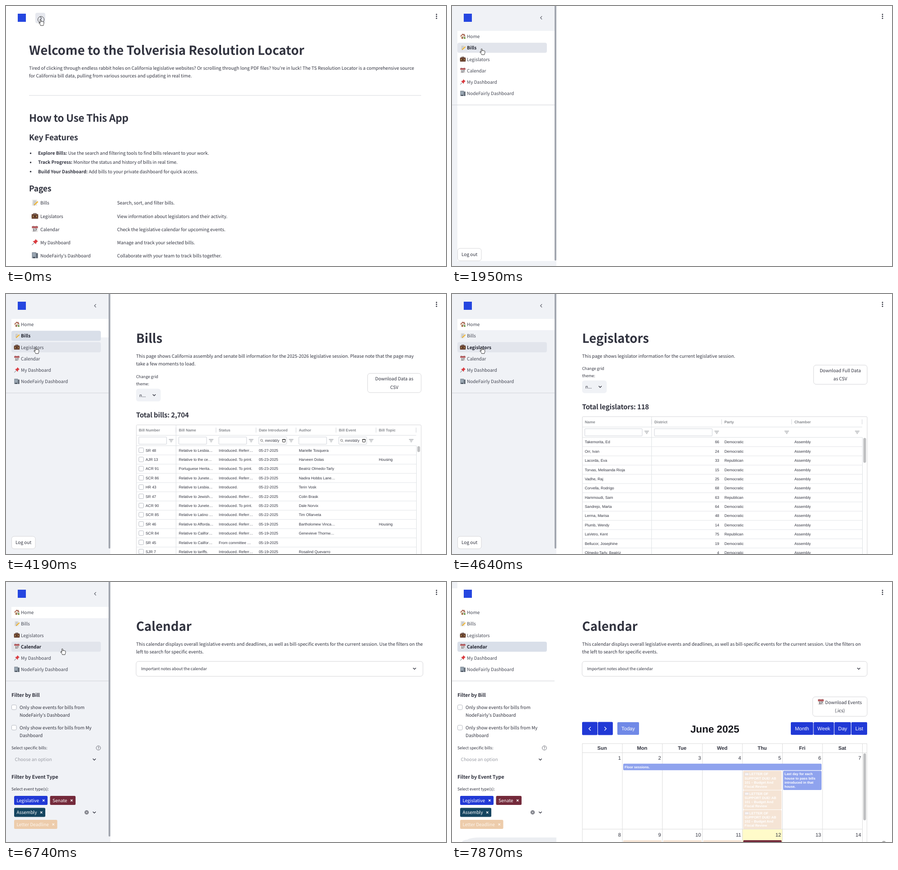
An HTML page for the animation above (7890 ms loop, 974x575 px).

```html
<!DOCTYPE html>
<html lang="en">
<head>
<meta charset="utf-8">
<title>Legislation app walkthrough</title>
<style>
  html, body { margin: 0; width: 100%; height: 100%; overflow: hidden; background: #fff; }
  svg { display: block; width: 100%; height: 100%; fill: #31333f; text-rendering: geometricPrecision;
        font-family: "Noto Sans CJK JP", "Noto Sans CJK SC", "Noto Sans CJK", "Noto Sans", sans-serif; }
  text { white-space: pre; }
  .grid { font-family: "Liberation Sans", Arial, sans-serif; }
</style>
</head>
<body>
<svg viewBox="0 0 974 575">
  <defs>
    <symbol id="home" viewBox="0 0 16 16">
      <path d="M11 2h2v5h-2z" fill="#9a5a45"/><path d="M3 7h10v8H3z" fill="#ecdcc0"/>
      <path d="M8 1L.8 8.2l1 1L8 4l6.200 5.200 1-1z" fill="#9c4f3a"/>
      <path d="M5 10h3v5H5z" fill="#8a4b35"/><path d="M9.500 9h2.500v3H9.500z" fill="#7fa6c4"/>
      <circle cx="13" cy="13" r="2.500" fill="#6c9a45"/>
    </symbol>
    <symbol id="memo" viewBox="0 0 16 16">
      <path d="M2 1h11v14H1z" fill="#e6e6e4"/><path d="M4 4h7M4 6.500h7M3.500 9h6M3.500 11.500h5" stroke="#a5abb2"/>
      <path d="M14 4.500l2 2-7.500 7-3 1 .8-3z" fill="#f0b83c"/><path d="M5.500 14.500l.4-1.600 1.200 1z" fill="#444"/>
    </symbol>
    <symbol id="case" viewBox="0 0 16 16">
      <path d="M5 5V2.500h6V5" fill="none" stroke="#4a3228" stroke-width="1.400"/>
      <rect y="4" width="16" height="11" rx="1.500" fill="#6a4433"/><path d="M0 8.500h16v1.500H0z" fill="#432b21"/>
      <path d="M3 8h2v3H3zM11 8h2v3h-2z" fill="#d1a85a"/>
    </symbol>
    <symbol id="date" viewBox="0 0 16 16">
      <path d="M1 2h14v13H1z" fill="#e8e6e5"/><path d="M1 1.500h14V6H1z" fill="#b5565a"/>
      <path d="M4 0v3M12 0v3" stroke="#777"/>
      <text class="grid" x="8" y="13.500" font-size="8.500" font-weight="700" text-anchor="middle">17</text>
    </symbol>
    <symbol id="pin" viewBox="0 0 16 16">
      <path d="M7 9l-6 6" stroke="#8d9299" stroke-width="1.300"/>
      <path d="M9.500.8l5.800 5.700-1.800.7-2.500 2.600-.4 3.400L3 5.800l3.600-.6L9 2.600z" fill="#da3b40"/>
    </symbol>
    <symbol id="office" viewBox="0 0 16 16">
      <path d="M1 1h10v14H1z" fill="#7d8894"/><path d="M11 3h4v12h-4z" fill="#59636f"/>
      <path d="M2.500 4h7M2.500 7h7M2.500 10h7" stroke="#b9c7d3" stroke-width="1.400"/><path d="M4 12h4v3H4z" fill="#424a55"/>
    </symbol>
  </defs>
  <g id="stage"></g>
</svg>
<script>
const LOOP = 7890;
const BOLD = 'font-weight="700"';
const SEMI = 'font-weight="600" letter-spacing="-.012em"';
const MIDDLE = 'text-anchor="middle"';
const BODY = 11.24;
const BLUE = '#2139d6', SOFT_BLUE = '#8fa3ee', PEACH = '#f5e4d5', GREY = '#f0f2f6';

// Text is placed by the vertical centre of its capitals.
const text = (x, mid, s, size = BODY, attrs = '') =>
  `<text x="${x}" y="${mid + size * .33}" font-size="${size / 1.117}" ${attrs}>${s}</text>`;
const cell = (x, mid, s, attrs = '', size = 8.4) =>
  `<text class="grid" x="${x}" y="${mid + size * .36}" font-size="${size}" ${attrs}>${s}</text>`;
const rect = (x, y, w, h, fill, rx = 0, stroke = 'none') =>
  `<rect x="${x}" y="${y}" width="${w}" height="${h}" rx="${rx}" fill="${fill}" stroke="${stroke}"/>`;
const path = (d, stroke = '#31333f', width = 1) =>
  `<path d="${d}" fill="none" stroke="${stroke}" stroke-width="${width}"/>`;
const icon = (id, cx, cy, size) =>
  `<use href="#${id}" x="${cx - size / 2}" y="${cy - size / 2}" width="${size}" height="${size}"/>`;
const lines = (x, mid, step, list, size, attrs) =>
  list.map((s, i) => text(x, mid + i * step, s, size, attrs)).join('');
const outline = (x, y, w, h, rx = 5.5) => rect(x, y, w, h, '#fff', rx, '#d6d6d9');
const down = (x, y) => path(`M${x - 3.2} ${y - 1.6}l3.200 3.200 3.200-3.200`, '#31333f', 1.4);
const side = (x, y, dir, color, r = 3.5) => path(`M${x - dir * r / 2} ${y - r}l${dir * r} ${r}l${-dir * r} ${r}`, color, 1.4);
const title = s => text(288, 97.5, s, 30.8, BOLD);

const links = [['home', 'Home'], ['memo', 'Bills'], ['case', 'Legislators'], ['date', 'Calendar'],
  ['pin', 'My Dashboard'], ['office', 'NodeFairly Dashboard']];

function home(x, wide) {
  const intro = wide
    ? ["Tired of clicking through endless rabbit holes on California legislative websites? Or scrolling through long PDF files? You're in luck! The TS Resolution Locator is a comprehensive source",
       'for California bill data, pulling from various sources and updating in real time.']
    : ["Tired of clicking through endless rabbit holes on California legislative websites? Or scrolling through long PDF files? You're in luck! The",
       'TS Resolution Locator is a comprehensive source for California bill data, pulling from various sources and updating in real time.'];
  const heading = wide ? ['Welcome to the Tolverisia Resolution Locator'] : ['Welcome to the Tolverisia Resolution', 'Locator'];
  const features = [['Explore Bills:', 'Use the search and filtering tools to find bills relevant to your work.'],
    ['Track Progress:', 'Monitor the status and history of bills in real time.'],
    ['Build Your Dashboard:', 'Add bills to your private dashboard for quick access.']];
  const notes = ['Search, sort, and filter bills.', 'View information about legislators and their activity.',
    'Check the legislative calendar for upcoming events.', 'Manage and track your selected bills.',
    'Collaborate with your team to track bills together.'];
  const y = wide ? 0 : 37.3;
  return lines(x, 97.5, 37.3, heading, 30.8, BOLD) + lines(x, 137 + y, 17.7, intro)
    + rect(x, 197 + y, 919 - x, 1.4, '#e2e3e7')
    + text(x, 247.5 + y, 'How to Use This App', 25.2, SEMI)
    + text(x, 291 + y, 'Key Features', 19.6, SEMI)
    + features.map(([a, b], i) => `<circle cx="${x + 3.5}" cy="${325.7 + y + i * 20.3}" r="1.700"/>`
      + text(x + 20, 325.3 + y + i * 20.3, `<tspan ${BOLD}>${a}</tspan> ${b}`)).join('')
    + text(x, 403.5 + y, 'Pages', 19.6, SEMI)
    + notes.map((note, i) => {
      const mid = 435.7 + y + i * 29.1, [id, name] = links[i + 1];
      return icon(id, x + 13, mid - .8, 15) + text(x + 25, mid, i == 4 ? "NodeFairly's Dashboard" : name)
        + text(wide ? 246 : 431, mid, note);
    }).join('');
}

const filterIcon = (x, y) => path(`M${x - 5} ${y - 2.7}h10M${x - 3.200} ${y}h6.400M${x - 1.400} ${y + 2.7}h2.800`, '#777b80', .9);

// Columns are [title, x, filter kind]; values come as "a|b|c" strings.
function grid(top, cols, rows, thumb, checks, rightCol) {
  const next = i => i + 1 < cols.length ? cols[i + 1][1] : 914;
  const edge = next(0) - 6.2;
  let out = outline(288.5, top, 630.5, 400, 2) + path(`M288 ${top + 23}H908M288 ${top + 46}H908M${edge} ${top}V575`, '#dcdfe3');
  cols.forEach(([name, x, kind], i) => {
    const end = next(i), mid = top + 34.7;
    out += cell(x, top + 11.5, name, BOLD + ' fill="#85888d"') + filterIcon(end - 17, mid)
      + path(`M${end - 6.2} ${top + 6}v11`, '#d0d3d8');
    if (kind) out += rect(x, mid - 8, end - x - 27, 16, '#fff', 1, '#cdd1d8');
    if (kind == 'date') out += `<circle cx="${x + 6}" cy="${mid - .6}" r="2.300" fill="none" stroke="#777"/>`
      + path(`M${x + 7.7} ${mid + 1.2}l2.200 2.200`, '#777') + cell(x + 13.5, mid, 'mm/dd/y')
      + rect(x + 52.5, mid - 2.8, 6, 6, '#fff', .5, '#222') + path(`M${x + 52} ${mid - 2.5}h7`, '#222', 1.5);
  });
  rows.forEach((row, r) => {
    const mid = top + 56.2 + r * 20.38;
    out += path(`M288 ${mid + 10.200}H908`, '#e2e4e8');
    if (checks) out += rect(294, mid - 5.5, 10.5, 10.5, '#fff', 2, '#b5b9c1');
    row.split('|').forEach((value, i) => out += i == rightCol
      ? cell(next(i) - 11.5, mid, value, 'text-anchor="end"')
      : cell(cols[i][1] + (checks && !i ? 15 : 0), mid, value));
  });
  return out + path(`M908.500 ${top + 46}V575`, '#dcdfe3') + rect(910.5, top + 47, 6, thumb, '#bfc0c2', 3);
}

// Theme picker, download button and total, shared by both table pages.
const controls = (y, right, button) => lines(288, 183 + y, 15.7, ['Change grid', 'theme:'], 9.8)
  + rect(288, 209.5 + y, 54.5, 28, GREY, 5.5) + text(295, 224 + y, 'n...') + down(right - 591, 223.5 + y)
  + outline(right - 118.5, 175.5 + y, 118.5, 42.5) + lines(right - 59.5, 187.7 + y, 18.2, button, BODY, MIDDLE);

function bills(stage, right = 919) {
  const cols = ['Bill Number', 'Bill Name', 'Status', 'Date Introduced', 'Author', 'Bill Event', 'Bill Topic']
    .map((name, i) => [name, 294 + i * 88.55, i == 6 ? '' : i == 3 || i == 5 ? 'date' : 'text']);
  const sent = 'Introduced. Referr…', print = 'Introduced. To print.';
  const rows = [
    `SR 48|Relative to Lesbia…|${sent}|05-27-2025|Marielle Tosquera`,
    `AJR 13|Relative to the ce…|${print}|05-23-2025|Harveen Dolas||Housing`,
    `ACR 91|Portuguese Herita…|${print}|05-23-2025|Beatriz Olmedo-Tarly`,
    `SCR 86|Relative to Junete…|${sent}|05-23-2025|Nadira Hobbs Lane…`,
    `HR 43|Relative to Lesbia…|Introduced.|05-22-2025|Terin Vosk`,
    `SR 47|Relative to Jewish…|${sent}|05-22-2025|Colin Brask`,
    `ACR 90|Relative to Junete…|${print}|05-22-2025|Dale Norvix`,
    `SCR 85|Relative to Latino …|${sent}|05-22-2025|Tim Ollarveta`,
    `SR 46|Relative to Afforda…|${sent}|05-19-2025|Bartholomew Vinca…||Housing`,
    `SCR 84|Relative to Califor…|${sent}|05-19-2025|Genevieve Thornw…`,
    `SR 45|Relative to Califor…|From committee …|05-19-2025`,
    `SJR 7|Relative to tariffs.|${sent}|05-19-2025|Rosalind Quevarro`];
  return title('Bills') + lines(288, 137, 17.7, [
    'This page shows California assembly and senate bill information for the 2025-2026 legislative session. Please note that the page may',
    'take a few moments to load.'])
    + (stage > 0 ? controls(0, right, ['Download Data as', 'CSV']) : '')
    + (stage > 1 ? text(288, 267.5, 'Total bills: 2,704', 16.8, SEMI) : '')
    + (stage > 1 ? grid(289.5, cols, stage > 2 ? rows : [], 13, true) : '');
}

function legislators(loaded) {
  const cols = [['Name', 294, 'text'], ['District', 448, 'text'], ['Party', 603], ['Chamber', 758]];
  const rows = ['Takemorita, Ed|66', 'Orr, Ivan|24', 'Lacorda, Eva|33', 'Torvas, Melisanda Rioja|15', 'Vadhe, Raj|25',
    'Corvella, Rodrigo|68', 'Hammoudi, Sam|63', 'Sandrejo, Marta|64', 'Lerma, Marisa|48', 'Plumb, Wendy|14',
    'LaVetro, Kent|75', 'Bellucor, Josephine|19', 'Olmedo-Tarly, Beatriz|4']
    .map((row, i) => `${row}|${[2, 6, 10].includes(i) ? 'Republican' : 'Democratic'}|Assembly`);
  return title('Legislators') + text(288, 137, 'This page shows legislator information for the current legislative session.')
    + controls(-18.3, 919, ['Download Full Data', 'as CSV'])
    + text(288, 249, 'Total legislators: 118', 16.8, SEMI)
    + (loaded ? grid(271.2, cols, rows, 55, false, 1) : '');
}

function month() {
  const white = 'fill="#fff"', x = i => 288 + i * 88.6;
  const event = (left, y, w, h, fill, list) => rect(left, y, w, h, fill, 2)
    + list.map((s, i) => cell(left + 3, y + 7.2 + i * 9.2, s, `${white} ${BOLD}`, 7.6)).join('');
  const button = (left, w, s, fill = BLUE) => rect(left, 310, w, 28, fill, 2)
    + cell(left + w / 2, 324.3, s, `${MIDDLE} ${white}`, 11.2);
  let out = rect(288, 309.5, 34, 29, BLUE, 2) + rect(323, 309.5, 33, 29, BLUE, 2)
    + side(305, 324.5, -1, '#fff', 4) + side(339.5, 324.5, 1, '#fff', 4)
    + button(366, 48, 'Today', '#7089e7') + cell(581.8, 324.5, 'June 2025', `${MIDDLE} ${BOLD} fill="#15161c"`, 22.4)
    + button(750, 49.5, 'Month') + button(800.5, 45, 'Week') + button(846.5, 36.5, 'Day') + button(884, 35, 'List')
    + rect(642.4, 547, 88.6, 28, '#fffbc9');
  for (let i = 0; i < 7; i++) {
    out += path(`M${x(i) + .5} 357V575`, '#dcdcdc')
      + cell(x(i) + 44.3, 367.3, ['Sun', 'Mon', 'Tue', 'Wed', 'Thu', 'Fri', 'Sat'][i], `${MIDDLE} ${BOLD}`, 11.2)
      + cell(x(i + 1) - 2.5, 388.7, i + 1, 'text-anchor="end"', 11.2)
      + cell(x(i + 1) - 2.5, 558.7, i + 8, 'text-anchor="end"', 11.2);
  }
  out += path('M288 357.500H919M288 377.500H919M288 546.500H908M908.500 357V575M918.500 357V575', '#dcdcdc')
    + event(379, 401.700, 439, 14.5, SOFT_BLUE, ['Floor sessions.'])
    + event(733, 417.5, 85, 42.5, SOFT_BLUE, ['Last day for each', 'house to pass bills', 'introduced in that', 'house.']);
  [101, 101, 102].forEach((n, i) => {
    const y = 417.5 + i * 43.2;
    out += event(644.5, y, 85, 42.3, PEACH, ['     LETTER OF', 'SUPPORT DUE! AB', n + ' – Budget And', 'Fiscal Review'])
      + rect(648, y + 4.5, 9, 6, '#f8f4f4', 1, '#e2dadb');
  });
  for (let i = 1; i < 5; i++) out += rect(x(i) + 2.3, 571, 85, 6, i == 4 ? '#742a3b' : PEACH, 2);
  return out + rect(910.5, 379, 6, 148, '#bfc0c2', 3);
}

function calendar(stage) {
  const done = stage > 2, right = done ? 919 : 923;
  const intro = 'This calendar displays overall legislative events and deadlines, as well as bill-specific events for the current session. Use the filters on';
  return title('Calendar')
    + lines(288, 137, 17.7, done ? [intro, 'the left to search for specific events.'] : [intro + ' the', 'left to search for specific events.'])
    + outline(288, 175.5, right - 288, 33) + text(299, 192, 'Important notes about the calendar', 9.8) + down(right - 18.7, 191.5)
    + (stage > 1 ? outline(right - 120.5, 254, 120.5, 43) + icon('date', right - 102.5, 265.5, 14.5)
      + text(right - 93, 266.5, 'Download Events') + text(right - 60.5, 284.7, '(.ics)', BODY, MIDDLE) : '')
    + (stage == 2 ? rect(288, 309, 635, 30.5, GREY, 5) : '') + (done ? month() : '');
}

function filters() {
  const tag = (x, y, w, s, fill, ink = '#fff') => rect(x, y, w, 20, fill, 2.5) + text(x + 5.5, y + 10, s, BODY, `fill="${ink}"`)
    + path(`M${x + w - 11} ${y + 8}l4.400 4.400m0-4.400l-4.400 4.400`, ink, 1.2);
  const option = (y, list) => rect(12.5, y - 5.7, 10.5, 10.5, '#fff', 2.5, '#b5b8c0') + lines(30, y, 17, list);
  return text(12, 249.7, 'Filter by Bill', 12.2, SEMI)
    + option(277.5, ['Only show events for bills from', "NodeFairly's Dashboard"])
    + option(322.5, ['Only show events for bills from My', 'Dashboard'])
    + text(12, 367, 'Select specific bills:', 9.8)
    + '<circle cx="204.500" cy="367" r="4.800" fill="none" stroke="#6c6e78"/>' + text(204.5, 367, '?', 8.5, MIDDLE)
    + text(19.5, 392.3, 'Choose an option', BODY, 'fill="#9b9da5"') + down(195.5, 392.3)
    + text(12, 431, 'Filter by Event Type', 12.2, SEMI) + text(12, 458, 'Select event type(s):', 9.8)
    + tag(18, 473, 74, 'Legislative', BLUE) + tag(97.5, 473, 56.5, 'Senate', '#742a3b')
    + tag(18, 499.5, 69, 'Assembly', '#154560') + tag(18, 526, 95.5, 'Letter Deadline', '#edccab', '#fdf6ee')
    + '<circle cx="178.500" cy="509.500" r="4.700" fill="#80828a"/>' + path('M176.800 507.800l3.400 3.400m0-3.400l-3.400 3.400', '#fff')
    + down(195.5, 509.5);
}

function sidebar({ active, hover, patch, plain, filtered }) {
  let out = plain
    ? rect(0, 0, 12, 14, GREY) + '<path d="M22 575q3-5 12-5q6-5 30-5H231V575z" fill="#eceef2"/>'
    : rect(0, 0, 231, 575, GREY) + (patch ? rect(12, 55, 215, patch - 55, '#fff') : '')
      + '<path d="M227 0h4v561q0 2-2 2t-2-2z" fill="#a3a7b0"/>' + side(197.5, 26, -1, '#6b6e78');
  links.forEach(([id, name], i) => {
    const mid = 67.2 + i * 25.3;
    if (i == active || i == hover) out += rect(12, mid - 11.2, 198, 22.3, i == hover ? '#e2e5ec' : '#d9dfe9', 4);
    out += icon(id, 24, mid - .5, 13) + text(33, mid, name, BODY, i == active ? BOLD + ' fill="#1c1e2a"' : 'fill="#444753"');
  });
  out += rect(0, 218.3, 227, 1.1, '#d3d5db');
  return out + (filtered ? filters() : outline(12.5, 536, 52.5, 27.5) + text(38.7, 549.7, 'Log out', BODY, MIDDLE));
}

const hand = ([x, y]) => `<path transform="translate(${x - 6.5} ${y - 7})" fill="#fff" stroke="#222" stroke-width=".9" stroke-linejoin="round"
  d="M4 9V1.600a1.100 1.100 0 0 1 2.200 0V5.400l.2-.6a1 1 0 0 1 2 .2l.3.2a1 1 0 0 1 1.900.4a1 1 0 0 1 1.700.7v3.200q0 1.700-1 2.700v1.500H5v-1.200L1.600 8.600a1 1 0 0 1 1.500-1.400z"/>`;

// Each entry changes part of the state at its time.
const steps = [
  [0, { page: home(51, true), slide: null, cursor: [78, 36.5], active: 0, hover: -1 }],
  [150, { page: home(288), slide: -110 }],
  [300, { slide: 0 }],
  [900, { cursor: [64, 114], hover: 1 }],
  [1050, { cursor: [66, 117], hover: 2 }],
  [1200, { cursor: [67, 101], hover: 1 }],
  [1800, { active: 1, page: `<g opacity=".35">${home(288)}</g>` }],
  [1950, { page: '', patch: 564 }],
  [2100, { page: bills(0) }],
  [2250, { page: bills(1, 923) }],
  [2550, { page: bills(1) }],
  [3000, { page: bills(2), patch: 96 }],
  [3300, { page: bills(3) }],
  [4040, { cursor: [67, 116], hover: 2 }],
  [4190, { cursor: [67, 125] }],
  [4340, { page: legislators(false), active: 2, patch: 80 }],
  [4640, { page: legislators(true) }],
  [5690, { cursor: [101, 131] }],
  [5840, { cursor: [118, 146], hover: 3 }],
  [5990, { cursor: [126, 154] }],
  [6440, { active: 3, page: `<g opacity=".35">${legislators(true)}</g>` }],
  [6590, { page: '' }],
  [6740, { page: calendar(1), filtered: true }],
  [7190, { plain: true, cursor: null, hover: -1 }],
  [7310, { page: calendar(2) }],
  [7450, { page: calendar(3) }],
  [7870, { badge: true }]
];

function draw(index) {
  const s = Object.assign({}, ...steps.slice(0, index + 1).map(step => step[1]));
  const closed = s.slide === null;
  stage.innerHTML = s.page + [18.700, 23, 27.300].map(y => `<circle cx="953" cy="${y}" r="1.400"/>`).join('')
    + (closed ? rect(65, 15, 22, 23, '#e6e8ee', 4) + side(77, 27, 1, '#6b6e78')
      + '<circle cx="77.500" cy="30" r="7" fill="none" stroke="#333" stroke-width=".9"/>'
      : `<g transform="translate(${s.slide})">${sidebar(s)}</g>`)
    + rect(26, 17, 18, 18, '#2546e0')
    + (s.badge ? '<circle cx="956" cy="578.500" r="5" fill="none" stroke="#555"/>' : '')
    + (s.cursor ? hand(s.cursor) : '');
}

const stage = document.getElementById('stage');
let shown = -1;
function tick() {
  const time = performance.now() % LOOP;
  const index = steps.findLastIndex(step => step[0] <= time);
  if (index != shown) draw(shown = index);
  requestAnimationFrame(tick);
}
tick();
</script>
</body>
</html>
```
